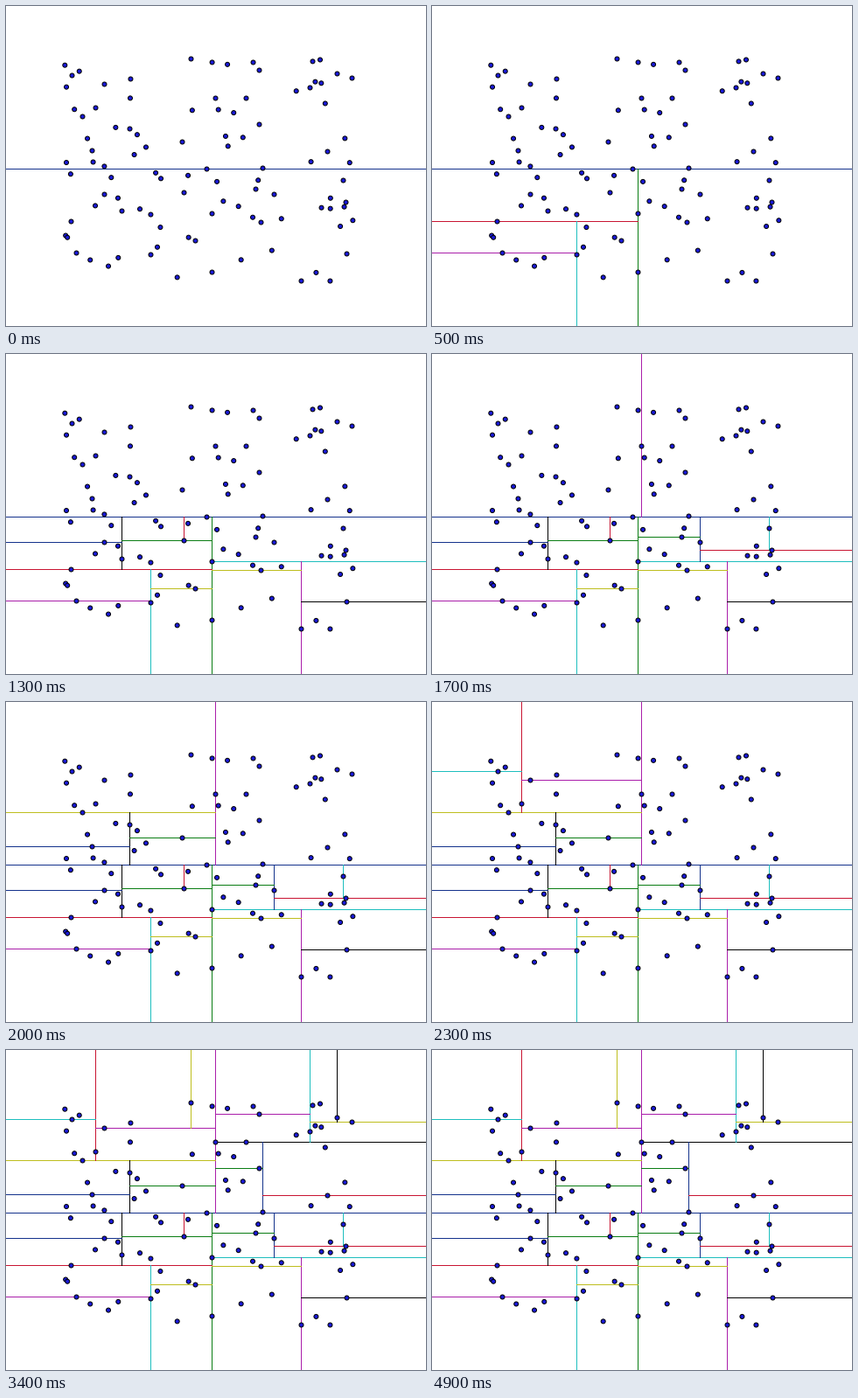
A matplotlib script for the animation above (5900 ms loop, 480 px wide and 366 px high).

```python
import random

import matplotlib.pyplot as plt
from matplotlib.animation import FuncAnimation
from matplotlib.patches import Circle

W, H, DPI = 480, 366, 100
PX = 72 / DPI
FRAMES, STEP = 59, 100
LEAF = 3

COLORS = ["#14328c", "#0a7d14", "#c81432", "#1ebebe", "#aa1eaa", "#bebe1e", "#000000"]

# Median points of the tree in build order: low half first, then high half.
PIVOTS = [
    (229, 186),
    (235, 304), (74, 246), (165, 284), (80, 282), (216, 268),
    (132, 234), (112, 215), (203, 213), (203, 213),
    (235, 237), (337, 314), (291, 247), (389, 283),
    (306, 215), (285, 209), (388, 224), (385, 199),
    (239, 105), (87, 126), (141, 140), (98, 165), (201, 155),
    (102, 116), (75, 79), (112, 89), (211, 60),
    (274, 105), (293, 185), (289, 135), (367, 166),
    (347, 93), (289, 73), (395, 82), (378, 77),
]

rng = random.Random(7)
pivots = iter(PIVOTS)
segments = []
dots = set(PIVOTS)


def fill(n, x0, y0, x1, y1):
    """Scatter the rest of a leaf's n points inside its cell."""
    own = sum(x0 <= x < x1 and y0 < y <= y1 for x, y in set(PIVOTS))
    for _ in range(n - own):
        dots.add((rng.uniform(max(x0 + 3, 64), min(x1 - 3, 397)),
                  rng.uniform(max(y0 + 3, 60), min(y1 - 3, 318))))


def split(n, x0, y0, x1, y1, across=True):
    """Build a k-d tree over n points, halving the cell in turn by y and x."""
    if n <= LEAF:
        fill(n, x0, y0, x1, y1)
        return
    x, y = next(pivots)
    low, high = n // 2, n - n // 2
    if across:
        segments.append(((x0, x1), (y, y)))
        split(low, x0, y, x1, y1, False)
        split(high, x0, y0, x1, y, False)
    else:
        segments.append(((x, x), (y0, y1)))
        split(low, x0, y0, x, y1)
        split(high, x, y0, x1, y1)


split(100, -1, -1, W, H)

fig = plt.figure(figsize=(W / DPI, H / DPI), dpi=DPI, facecolor="white")
ax = fig.add_axes([0, 0, 1, 1])
# Whole numbers fall on pixel centres.
ax.set_xlim(-0.5, W - 0.5)
ax.set_ylim(H - 0.5, -0.5)
ax.axis("off")

lines = [
    ax.plot(xs, ys, color=COLORS[k % len(COLORS)], lw=PX, snap=False)[0]
    for k, (xs, ys) in enumerate(segments)
]
for dot in sorted(dots):
    ax.add_patch(Circle(dot, 2.5, fc="#1919d7", ec="black", lw=PX, zorder=3))


def update(i):
    # A slow start, then six lines every five steps.
    count = 1 + max(0, i - 1, 6 * i // 5 - 2)
    for k, line in enumerate(lines):
        line.set_visible(k < count)
    return lines


anim = FuncAnimation(fig, update, frames=FRAMES, interval=STEP, repeat=True, repeat_delay=0)
plt.show()
```
